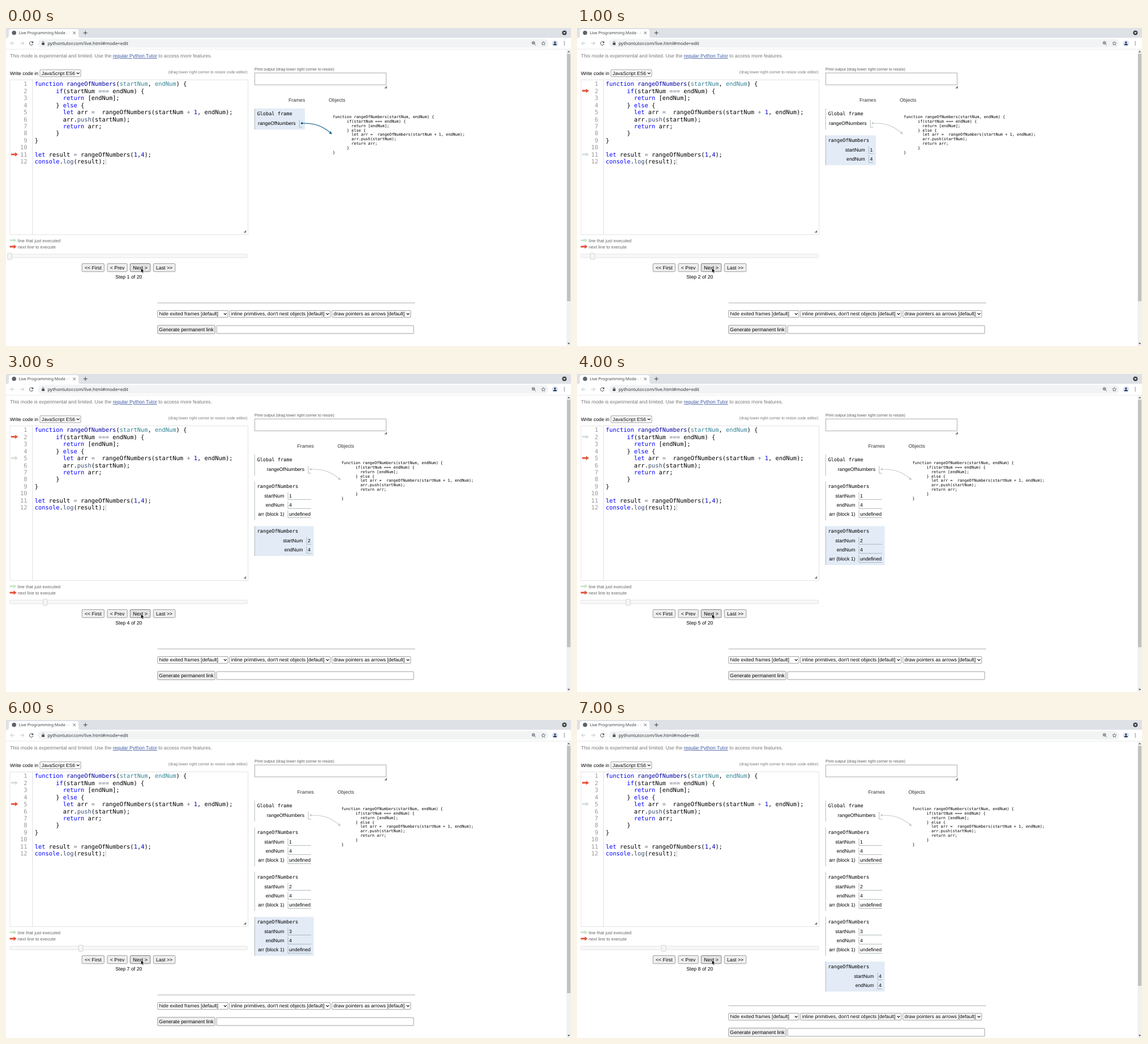
These frames come from a looping animation (998x561 px, 8 s). An HTML page:

```html
<!DOCTYPE html>
<html lang="en">
<head>
<meta charset="utf-8">
<title>Live Programming Mode</title>
<style>
html, body { margin: 0; width: 100%; height: 100%; overflow: hidden; background: #fff; }
svg { display: block; width: 998px; height: 561px; }
text { white-space: pre; text-rendering: geometricPrecision; font-family: "Liberation Sans", Arial, sans-serif; }
.mono { font-family: "DejaVu Sans Mono", monospace; }
.ui { font-family: "Noto Sans", sans-serif; }
.kw { fill: #00f; }
.def { fill: #0000a2; }
.par { fill: #318495; }
.op { fill: #687687; }
.num { fill: #0000cd; }
.fn { fill: #3c4c72; }
</style>
</head>
<body>
<svg id="stage" viewBox="0 0 998 561">
  <defs>
    <linearGradient id="fade"><stop offset="0" stop-color="#fff" stop-opacity="0"/><stop offset="1" stop-color="#fff"/></linearGradient>
    <path id="pointer" d="M0-1.5H7V-3.7L12.2 0L7 3.7V1.5H0Z"/>
  </defs>
  <g id="browser"></g>
  <g id="page"></g>
  <g id="state"></g>
  <g id="footer"></g>
  <g id="cursor"></g>
</svg>
<script>
const STEP_MS = 1000, STEPS = 8;
const $ = id => document.getElementById(id);

const code = [
  'function rangeOfNumbers(startNum, endNum) {',
  '      if(startNum === endNum) {',
  '        return [endNum];',
  '      } else {',
  '        let arr =  rangeOfNumbers(startNum + 1, endNum);',
  '        arr.push(startNum);',
  '        return arr;',
  '      }',
  '}',
  '',
  'let result = rangeOfNumbers(1,4);',
  'console.log(result);'
];

// Execution arrows per step: [line just run, next line]
const arrows = [[0, 11], [11, 2], [2, 5], [5, 2], [2, 5], [5, 2], [2, 5], [5, 2]];

// y is the middle of the capitals
const text = (x, y, s, size = 8.67, attrs = '') =>
  `<text x="${x}" y="${y + size * .355}" font-size="${size}" ${attrs}>${s}</text>`;
const mono = (x, y, s, size, attrs = '') => text(x, y, s, size, 'class="mono" ' + attrs);
const right = 'text-anchor="end"';
const mid = 'text-anchor="middle"';
const rect = (x, y, w, h, fill = '#fff', stroke = 'none', r = 0, sw = .7) =>
  `<rect x="${x}" y="${y}" width="${w}" height="${h}" rx="${r}" fill="${fill}" stroke="${stroke}" stroke-width="${sw}"/>`;
const path = (d, stroke, sw = .8, fill = 'none') =>
  `<path d="${d}" fill="${fill}" stroke="${stroke}" stroke-width="${sw}"/>`;
const dot = (x, y, r, fill) => `<circle cx="${x}" cy="${y}" r="${r}" fill="${fill}"/>`;
const fillPath = (d, fill) => path(d, 'none', 0, fill);

const button = (x, y, w, h, s, fill = '#efefef', stroke = '#767676') =>
  rect(x, y, w, h, fill, stroke, 1.5) + text(x + w / 2, y + h / 2, s, 8.75, mid);
const select = (x, y, w, s) =>
  rect(x, y, w, 12, '#fff', '#767676', 1) + text(x + 2.8, y + 6, s, 8.7) +
  path(`M${x + w - 7.2} ${y + 4.8}l2.4 2.4l2.4-2.4`, '#111', 1.2);
const pointer = (x, y, fill) => `<use href="#pointer" x="${x}" y="${y}" fill="${fill}"/>`;
const grip = (x, y) => fillPath(`M${x} ${y}v-4.6l-4.6 4.6z`, '#777');

function paint(line, i) {
  const tokens = /\b(function|if|return|else|let|console)\b|(===|[=+])|\b(\d)\b|\b(push|log)\b|(rangeOfNumbers)|(startNum|endNum)/g;
  return line.replace(tokens, (s, kw, op, num, fn, def, par) => {
    const c = kw ? 'kw' : op ? 'op' : num ? 'num' : fn ? 'fn' : i ? '' : def ? 'def' : 'par';
    return c ? `<tspan class="${c}">${s}</tspan>` : s;
  });
}

function browser() {
  return rect(0, 0, 998, 17.5, '#dee1e6') +
    fillPath('M1 17.5Q5 17.5 5 13.5V6Q5 2 9 2H124Q128 2 128 6V13.5Q128 17.5 132 17.5Z', '#fff') +
    dot(14.2, 8.5, 3.8, '#5f6368') +
    text(22.7, 8.6, 'Live Programming Mode - P', 7.1, 'class="ui" fill="#3c4043"') +
    rect(104, 3, 10, 12, 'url(#fade)') + rect(114, 3, 10, 12) +
    path('M118.4 6.4l4.4 4.4m0-4.4l-4.4 4.4', '#45494d', .9) +
    path('M136.8 8.6h6.8m-3.4-3.4v6.8', '#3c4043', 1) +
    dot(986.3, 8.6, 4, '#3c4043') + fillPath('M984 7.5h4.6l-2.3 2.7z', '#fff') +
    rect(0, 17.5, 998, 19.5) + rect(56, 19.5, 902, 15, '#f1f3f4', 'none', 7.5) +
    path('M0 37.3H998', '#dadce0', .6) +
    path('M14.8 27H8.2m3.2-3.2L8.2 27l3.2 3.2', '#b6b9bd', .9) +
    path('M25 27h6.6m-3.2-3.2l3.2 3.2l-3.2 3.2', '#b6b9bd', .9) +
    path('M47.2 25.1A3.2 3.2 0 1 0 47.8 28', '#45494d', 1) + fillPath('M48.2 23v3.4h-3.4z', '#45494d') +
    rect(63.2, 26, 4.8, 4, '#4d5156', 'none', .6) + path('M64.2 26v-1a1.4 1.5 0 0 1 2.8 0v1', '#4d5156', .7) +
    text(73.4, 27.1, 'pythontutor.com/live.html#mode=edit', 7.96, 'class="ui" fill="#303438"') +
    `<circle cx="931.6" cy="26.2" r="2.4" fill="none" stroke="#45494d" stroke-width=".9"/>` +
    path('M933.4 28l2.4 2.4M930.4 26.2h2.4M931.6 25v2.4', '#45494d', .8) +
    path('M949.2 23.7l1 2.2l2.4.3l-1.8 1.6l.5 2.4l-2.1-1.2l-2.1 1.2l.5-2.4l-1.8-1.6l2.4-.3z', '#45494d', .7) +
    dot(969.7, 27, 5.4, '#dbe3f1') + dot(969.7, 25.3, 1.6, '#26365c') +
    fillPath('M966.5 30.2q0-2.7 3.2-2.7t3.2 2.7z', '#26365c') +
    [24.2, 27, 29.8].map(y => dot(986.2, y, .8, '#45494d')).join('');
}

function page() {
  let s = text(7, 49.2, 'This mode is experimental and limited. Use the ' +
      '<tspan fill="#3d58a2" text-decoration="underline">regular Python Tutor</tspan>' +
      ' to access more features.', 8.65, 'fill="#777"') +
    text(7, 79.7, 'Write code in', 8.6) + select(60, 73.8, 72, 'JavaScript ES6') +
    text(426.5, 77.8, '(drag lower right corner to resize code editor)', 7, right + ' fill="#777"') +
    rect(7, 91.5, 420.5, 273, '#fff', '#d9d9d9') + path('M46.8 92V364.5', '#d2d2d2', .7) +
    grip(424.2, 361);
  code.forEach((line, i) => {
    const y = 98.6 + i * 12.45;
    s += mono(37.5, y, i + 1, 10.38, right + ' fill="#999"') + mono(50.7, y, paint(line, i), 10.38);
  });
  return s + path('M176.2 230.2v11.4', '#aaa', .7) +
    pointer(6.6, 374.6, '#c9e6ca') + pointer(6.6, 385.8, '#e5533d') +
    text(20.7, 375.2, 'line that just executed', 7.8, 'fill="#666"') +
    text(20.7, 386.5, 'next line to execute', 7.8, 'fill="#666"') +
    rect(7, 399, 419.5, 6.2, '#f8f8f8', '#d8d8d8', 1.5) +
    button(134.2, 415.6, 39.2, 14.2, '&lt;&lt; First') +
    button(179, 415.6, 35.2, 14.2, '&lt; Prev') +
    button(219.3, 415.6, 35.6, 14.2, 'Next &gt;', '#e3e3e3', '#4f4f4f') +
    button(260.3, 415.6, 38.6, 14.2, 'Last &gt;&gt;') +
    text(439, 72.9, 'Print output (drag lower right corner to resize)', 7, 'fill="#555"') +
    rect(439.3, 79.2, 232, 21, '#fff', '#888') + grip(672.8, 106.4);
}

const footer = path('M267.5 485H722.5', '#aaa', 1) +
  select(267.8, 498.4, 124.2, 'hide exited frames [default]') +
  select(394.8, 498.4, 178, "inline primitives, don't nest objects [default]") +
  select(575.8, 498.4, 139, 'draw pointers as arrows [default]') +
  button(267.8, 524.4, 101.4, 15, 'Generate permanent link') +
  rect(372, 525, 348, 14, '#fff', '#767676', 1);

const panel = (y, h, edge, active) =>
  (active ? rect(439, y, edge - 439, h, '#e2ebf6') : '') + path(`M439.2 ${y}v${h}`, '#a6b3b6', .9);
const cell = (x, y, end) => path(`M${x} ${y - 6.2}v12.8H${end}`, '#a6b3b6', .9);

function callFrame(i, full, active, edge) {
  const top = 189.4 + i * 79;
  const rows = [['startNum', i + 1], ['endNum', 4]];
  if (full) rows.push(['arr (block 1)', 'undefined']);
  const x = full ? 498 : edge - 12.6;
  return panel(top, full ? 68.6 : 52.6, edge, active) +
    mono(443.4, top + 8.5, 'rangeOfNumbers', 8.65) +
    rows.map(([name, value], r) => {
      const y = top + 25.4 + r * 16;
      return text(x - 6.6, y, name, 8.67, right) + text(x + 2, y, value) + cell(x, y, edge - 4.6);
    }).join('');
}

function heap(dx, color) {
  return text(570 + dx, 127, 'Objects', 8.65, 'fill="#333"') +
    code.slice(0, 9).map((l, i) => mono(577 + dx, 156.7 + i * 7.8, l, 6.93)).join('') +
    `<g transform="translate(${dx})">` + dot(522.6, 168, 1.8, color) +
    path('M522.6 168C544 168 556 171 573 184.6', color, 1.1) +
    fillPath('M576 187.4L573.3 181.4L572.8 184.3L569.8 185.6Z', color) + '</g>';
}

function draw(n) {
  const first = n === 0, dx = n < 2 ? 0 : 15.6, edge = 528 + dx;
  const calls = n === 0 ? 0 : Math.ceil(n / 2) + (n % 2 ? 0 : 0);
  const [prev, next] = arrows[n];
  const lineY = k => 98.4 + (k - 1) * 12.45;
  const shift = n === 7 ? 19 : 0;

  let s = (prev ? pointer(9, lineY(prev), '#d9dcd9') : '') + pointer(9, lineY(next), '#e5533d') +
    rect(2.7 + n * 20.95, 397.3, 7.6, 11, '#f6f6f6', '#c5c5c5', 1.5) +
    text(216.8, 438.6, `Step ${n + 1} of 20`, 8.75, mid) +
    text(499 + dx, 127, 'Frames', 8.65, 'fill="#333"') +
    panel(142, 37.2, edge, first) + mono(443.4, 151, 'Global frame', 8.65) +
    text(511.5 + dx, 168.2, 'rangeOfNumbers', 8.67, right) + cell(518.2 + dx, 168.4, 523.4 + dx);
  for (let i = 0; i < calls; i++) {
    const last = i === calls - 1;
    s += callFrame(i, !last || n % 2 === 0, last, edge);
  }
  s += heap(dx, first ? '#005583' : '#c8c8c8');

  // Page scrollbar
  s += rect(990, 37.6, 8, 523.4, '#f1f1f1') + rect(991, 45.5, 6, shift ? 423.5 : 436.5, '#c1c1c1') +
    fillPath('M991.8 42.8h4.4l-2.2-2.6z', '#555') + fillPath('M991.8 555.6h4.4l-2.2 2.6z', '#555');
  $('state').innerHTML = s;
  $('footer').setAttribute('transform', `translate(0 ${shift})`);
}

$('browser').innerHTML = browser();
$('page').innerHTML = page();
$('footer').innerHTML = footer;
$('cursor').innerHTML = path('M238.4 423.6v8.2l1.9-1.7l1.2 2.7l1.3-.6l-1.2-2.6h2.6z', '#fff', .6, '#000');

let shown = -1;
function tick() {
  const n = Math.floor(performance.now() / STEP_MS) % STEPS;
  if (n !== shown) draw(shown = n);
  requestAnimationFrame(tick);
}
tick();
</script>
</body>
</html>
```
